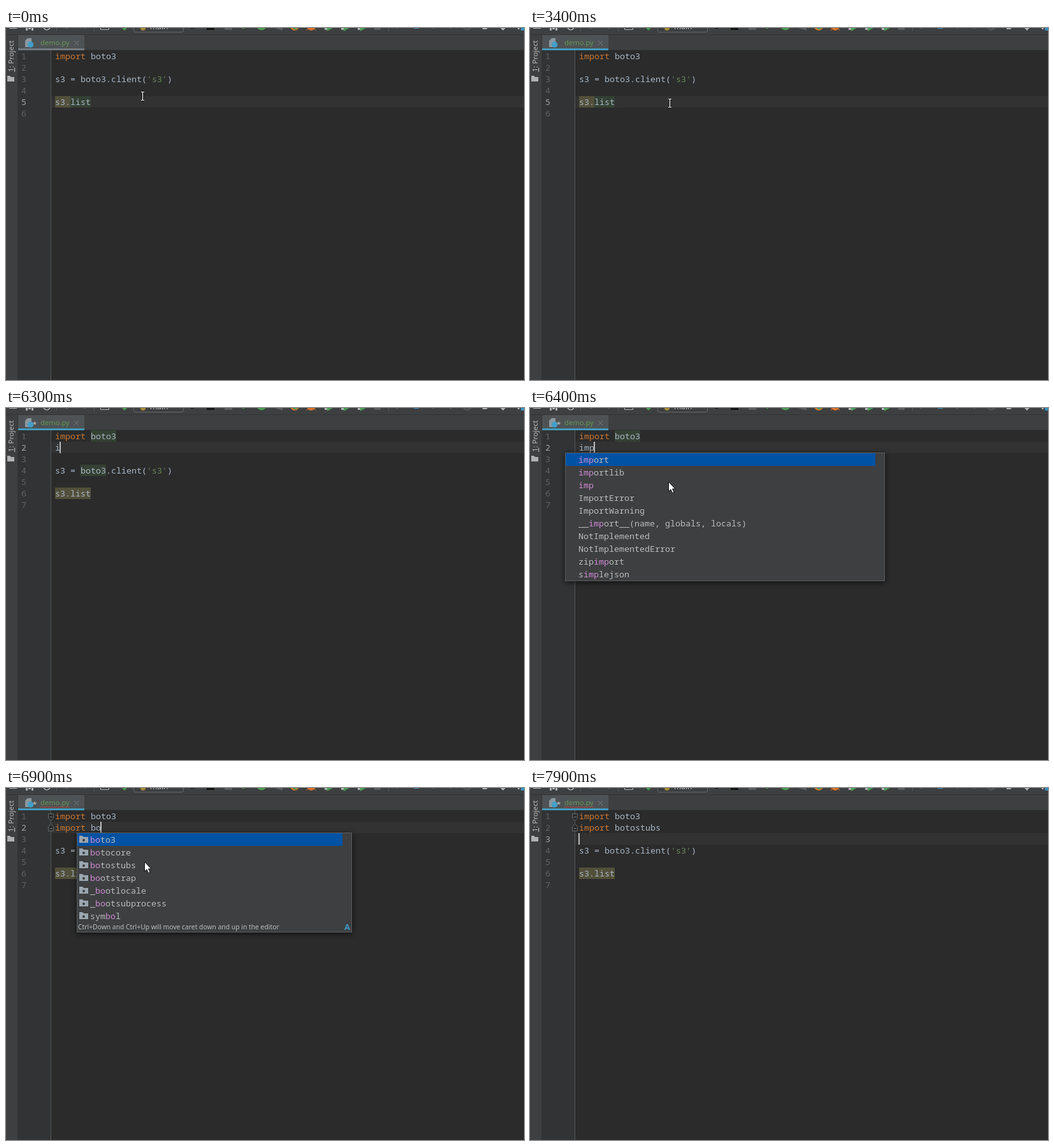
An HTML page that plays this animation: 813x553 px, repeating every 8000 ms.

```html
<!DOCTYPE html>
<html lang="en">
<head>
<meta charset="utf-8">
<title>Editor completion</title>
<style>
  html, body { margin: 0; width: 100%; height: 100%; overflow: hidden; background: #2b2b2b; }
  svg { display: block; }
  text { white-space: pre; }
  .mono { font: 13.333px "Noto Sans Mono", "DejaVu Sans Mono", monospace; }
  .ui { font-family: "Noto Sans", "Open Sans", sans-serif; }
  .raised { filter: drop-shadow(0 2px 4px rgba(0, 0, 0, .65)); }
</style>
</head>
<body>
<svg width="813" height="553" viewBox="0 0 813 553">
  <g id="chrome"></g>
  <g id="editor"></g>
</svg>
<script>
const LOOP = 8000, LEFT = 77, TOP = 35, CHAR = 8, LINE = 18, ROW = 20;
const COLOR = {
  text: '#a9b7c6', keyword: '#cc7832', string: '#6a8759', panel: '#3d3f40',
  weak: '#52503a', usage: '#344134', brace: '#3b514d', select: '#0052a4'
};

const rect = (x, y, w, h, fill, extra = '') =>
  `<rect x="${x}" y="${y}" width="${w}" height="${h}" fill="${fill}" ${extra}/>`;
const path = (d, stroke, fill = 'none', width = 1) =>
  `<path d="${d}" stroke="${stroke}" fill="${fill}" stroke-width="${width}"/>`;
const circle = (x, y, r, fill) => `<circle cx="${x}" cy="${y}" r="${r}" fill="${fill}"/>`;
const escapeText = s => s.replace(/&/g, '&amp;').replace(/</g, '&lt;');
const mono = (x, y, s, fill) =>
  `<text class="mono" x="${x}" y="${y}" fill="${fill}">${escapeText(s)}</text>`;
const ui = (x, y, size, s, fill, extra = '') =>
  `<text class="ui" x="${x}" y="${y}" font-size="${size}" fill="${fill}" ${extra}>${s}</text>`;
const colX = col => LEFT + col * CHAR;
const lineY = line => TOP + (line - 1) * LINE;

function toolbar() {
  const gray = '#afb1b3', dim = '#5b5e60', green = '#499c54', orange = '#d9702b';
  const bits = [
    [5, 12, 1, gray], [31, 3, 4, gray], [35, 4, 2, gray], [40, 3, 4, gray],
    [93, 4, 1, dim], [122, 3, 1, dim], [290, 5, 1, '#111'], [315, 12, 3, '#111'],
    [343, 12, 3, dim], [371, 3, 1, green], [578, 10, 3, dim], [612, 3, 1, dim],
    [640, 8, 1, '#3592c4'], [669, 3, 1, dim], [696, 3, 1, dim],
    [803, 3, 2, gray], [808, 5, 4, '#3592c4']
  ].map(([x, w, h, c]) => rect(x, 0, w, h, c)).join('');
  const separators = [79, 138, 600].map(x => rect(x, 0, 1, 5, '#555759')).join('');
  const play = [500, 526, 552].map(x =>
    path(`M${x + 4} -5L${x + 13} 0L${x + 4} 5Z`, 'none', green) + rect(x, 0, 4, 3, gray)).join('');
  return bits + separators + play +
    path('M59 0Q64 6 69 0', gray, 'none', 1.6) +
    path('M148.5 0V2.5H161.5V0', gray) +
    path('M182 0L186 4L190 0', 'none', green) +
    path('M200.5 0V4Q200.5 6.500 203 6.500H276Q278.500 6.500 278.500 4V0', '#646668') +
    circle(215, 0, 4, '#a68b35') + ui(226, 2, 12, 'main', '#bbb') +
    path('M394 0Q401 7 408 0Z', 'none', green) +
    path('M421 0L434 4V0Z', 'none', dim) +
    circle(453, -3, 7, orange) + path('M449 0L454 3L458 0Z', 'none', green) +
    circle(479, -2, 6, orange) + path('M474 0L472 4M479 0V4M484 0L486 4', orange) +
    path('M718 0Q724 6 730 0M722 0H727', dim, 'none', 1.3) +
    path('M748 0V2H754L756 0Z', 'none', gray) +
    path('M776 0L780 4L784 0Z', 'none', gray);
}

function chrome() {
  return rect(0, 0, 813, 553, '#2b2b2b') +
    rect(0, 0, 813, 35, COLOR.panel) + rect(0, 10, 813, 1, '#323435') + toolbar() +
    rect(0, 11, 18, 542, COLOR.panel) + rect(18, 11, 1, 542, '#323435') +
    rect(19, 34, 794, 1, '#323435') +
    rect(19, 11, 104, 24, '#4e5254') +
    path('M34 16H40V30H30V20Z', 'none', '#8d979e') + circle(38.5, 26, 4.7, '#429fc9') +
    ui(54, 27, 11.2, 'demo.py', '#629755') +
    path('M107 20L114 27M114 20L107 27', '#75797b') +
    ui(0, 0, 11.4, '<tspan text-decoration="underline">1</tspan>: Project', '#bbb',
      'transform="translate(12 69) rotate(-90)"') +
    path('M2 75H6L8 77H13V84H2Z', 'none', '#afb1b3') +
    rect(19, 35, 51, 518, '#313335') + rect(70, 35, 1, 518, '#555');
}

function codeLine(source, line) {
  const tokens = source.match(/\bimport\b|'[^']*'|[^' ]+| +/g) || [];
  let col = 0;
  return tokens.map(token => {
    const fill = token === 'import' ? COLOR.keyword : token[0] === "'" ? COLOR.string : COLOR.text;
    const out = mono(colX(col), lineY(line) + 14, token, fill);
    col += token.length;
    return out;
  }).join('');
}

const mark = (line, col, length, fill) =>
  rect(colX(col), lineY(line), length * CHAR, LINE, fill);

function hint() {
  return path('M88.500 133.500H128L133 127L138 133.500H177.500Q181.500 133.500 181.500 137.500V156.500' +
    'Q181.500 160.500 177.500 160.500H88.500Q84.500 160.500 84.500 156.500V137.500Q84.500 133.500 88.500 133.500Z',
    '#5e6162', '#4b4d4d') +
    ui(133, 151, 11.4, 'No suggestions', '#bbb', 'text-anchor="middle"');
}

function popup({ x, width, items, prefix, selected, footer, modules }) {
  const height = items.length * ROW + (footer ? 17 : 2);
  let out = rect(x + .5, 70.5, width - 1, height - 1, COLOR.panel, 'stroke="#5b5e60" class="raised"');
  items.forEach((item, i) => {
    const y = 71 + i * ROW;
    if (i === selected) out += rect(x + 1, y, width - 16, ROW, COLOR.select);
    if (modules) {
      out += path(`M${x + 4} ${y + 4}H${x + 9}L${x + 11} ${y + 6}H${x + 18}V${y + 15}H${x + 4}Z`,
        'none', '#9aa7b0') + circle(x + 11, y + 11, 2, COLOR.panel);
    }
    const at = item.indexOf(prefix), textX = x + 21;
    out += mono(textX, y + 15, item, '#bbb');
    if (at >= 0) {
      // Cover the matched letters before repainting them in the match colour.
      out += rect(textX + at * CHAR, y + 1, prefix.length * CHAR, 18,
        i === selected ? COLOR.select : COLOR.panel) +
        mono(textX + at * CHAR, y + 15, prefix, '#d08bd5');
    }
  });
  if (footer) {
    const y = 70 + height;
    out += ui(x + 2, y - 5, 10.33,
      'Ctrl+Down and Ctrl+Up will move caret down and up in the editor', '#bbb') +
      ui(x + 420, y - 4, 13, 'A', '#3f9bc4', 'font-weight="600"');
  }
  return out;
}

const ibeam = ([x, y]) => {
  const d = `M${x - 2} ${y - 6.5}H${x + 3}M${x + .5} ${y - 6}V${y + 6}M${x - 2} ${y + 6.5}H${x + 3}`;
  return path(d, '#111', 'none', 3) + path(d, '#fff', 'none', 1.2);
};
const arrow = () =>
  path('M217.500 116V131L221 128L223.500 133.500L226 132.300L223.500 127H228Z', '#111', '#fff');

function folds() {
  return path('M66.500 40.500H74.500V47.500L70.500 51.500L66.500 47.500Z', '#65686a', '#2b2b2b') +
    path('M66.500 67.500H74.500V60.500L70.500 56.500L66.500 60.500Z', '#65686a', '#2b2b2b') +
    path('M68.500 45.500H72.500M68.500 63.500H72.500', '#77797b');
}

function squiggle(x, end, y) {
  let d = `M${x} ${y + 2}`;
  for (let i = 1; x + i * 2 <= end; i++) d += `L${x + i * 2} ${y + (i % 2 ? 0 : 2)}`;
  return path(d, '#bc3f3c');
}

function editor(s) {
  const client = "s3 = boto3.client('s3')";
  const lines = s.typed === null
    ? ['import boto3', '', client, '', 's3.list', '']
    : ['import boto3', s.typed, '', client, '', 's3.list', ''];
  const clientLine = lines.indexOf(client) + 1, callLine = lines.indexOf('s3.list') + 1;
  const [caretLine, caretCol] = s.caret;
  let out = rect(19, 32, 104, 3, s.focused ? '#429bbd' : '#747a80') +
    rect(71, lineY(caretLine), 742, LINE, '#323232');

  out += mark(callLine, 0, 7, COLOR.weak);
  if (s.usage === 'list') out += mark(callLine, 3, 4, COLOR.usage);
  if (s.usage === 'boto3') {
    out += mark(1, 7, 5, COLOR.usage) + mark(clientLine, 5, 5, COLOR.usage);
  }
  lines.forEach((source, i) => {
    const line = i + 1;
    out += mono(24, lineY(line) + 14, String(line), line === caretLine ? '#a4a3a3' : '#606366') +
      codeLine(source, line);
  });
  if (s.braces) {
    [[17, '('], [22, ')']].forEach(([col, char]) => {
      out += mark(clientLine, col, 1, COLOR.brace) +
        mono(colX(col), lineY(clientLine) + 14, char, '#ffef28');
    });
  }
  if (s.parsed) out += folds() + squiggle(54, 100, 29);
  if (s.modified) out += mono(41, 31, '*', '#c5c8ca');
  if (s.blink) out += rect(colX(caretCol) - 1, lineY(caretLine), 2, LINE, '#bbb');
  if (s.hint) out += hint();
  if (s.popup) out += popup(s.popup) + arrow();
  if (s.mouse) out += ibeam(s.mouse);
  return out;
}

const keywordPopup = {
  x: 55, width: 502, prefix: 'imp', selected: 0,
  items: ['import', 'importlib', 'imp', 'ImportError', 'ImportWarning', '__import__(name, globals, locals)',
    'NotImplemented', 'NotImplementedError', 'zipimport', 'simplejson']
};
const modulePopup = {
  x: 111, width: 432, prefix: 'bo', selected: 0, footer: true, modules: true,
  items: ['boto3', 'botocore', 'botostubs', 'bootstrap', '_bootlocale', '_bootsubprocess', 'symbol']
};
const narrowedPopup = {
  ...modulePopup, prefix: 'boto', selected: 2, items: modulePopup.items.slice(0, 3)
};

// Each entry changes only the listed parts of the state.
const timeline = [
  [0, { typed: null, caret: [5, 7], blink: false, usage: 'list', mouse: [214, 107] }],
  [1400, { mouse: [215, 112] }],
  [1500, { mouse: [216, 119] }],
  [1600, { mouse: [217, 121] }],
  [1800, { mouse: [219, 121] }],
  [1900, { mouse: [219, 119], blink: true, focused: true }],
  [2000, { mouse: [219, 118] }],
  [2300, { hint: true }],
  [2400, { blink: false }],
  [2900, { blink: true }],
  [3400, { blink: false, hint: false }],
  [3800, { hint: true }],
  [3900, { blink: true }],
  [4400, { blink: false }],
  [4600, { blink: true, hint: false, mouse: null, caret: [4, 0] }],
  [4800, { usage: null }],
  [5000, { caret: [3, 23], braces: true }],
  [5500, { caret: [2, 0], braces: false }],
  [5800, { caret: [1, 12] }],
  [6000, { usage: 'boto3' }],
  [6100, { typed: '', caret: [2, 0] }],
  [6300, { typed: 'i', caret: [2, 1], modified: true }],
  [6400, { typed: 'imp', caret: [2, 3], popup: keywordPopup }],
  [6600, { typed: 'import ', caret: [2, 7], popup: null }],
  [6700, { typed: 'import b', caret: [2, 8] }],
  [6800, { typed: 'import bo', caret: [2, 9], usage: null }],
  [6900, { popup: modulePopup, parsed: true }],
  [7100, { typed: 'import boto', caret: [2, 11], popup: narrowedPopup }],
  [7600, { typed: 'import botostubs', caret: [2, 16], popup: null }],
  [7900, { caret: [3, 0] }]
];

const editorLayer = document.getElementById('editor');
document.getElementById('chrome').innerHTML = chrome();
let shown = 0;

function draw(time) {
  const past = timeline.filter(([start]) => start <= time);
  if (past.length === shown) return;
  shown = past.length;
  editorLayer.innerHTML = editor(Object.assign({}, ...past.map(([, change]) => change)));
}

const began = performance.now();
function tick() {
  draw((performance.now() - began) % LOOP);
  requestAnimationFrame(tick);
}
tick();
</script>
</body>
</html>
```
